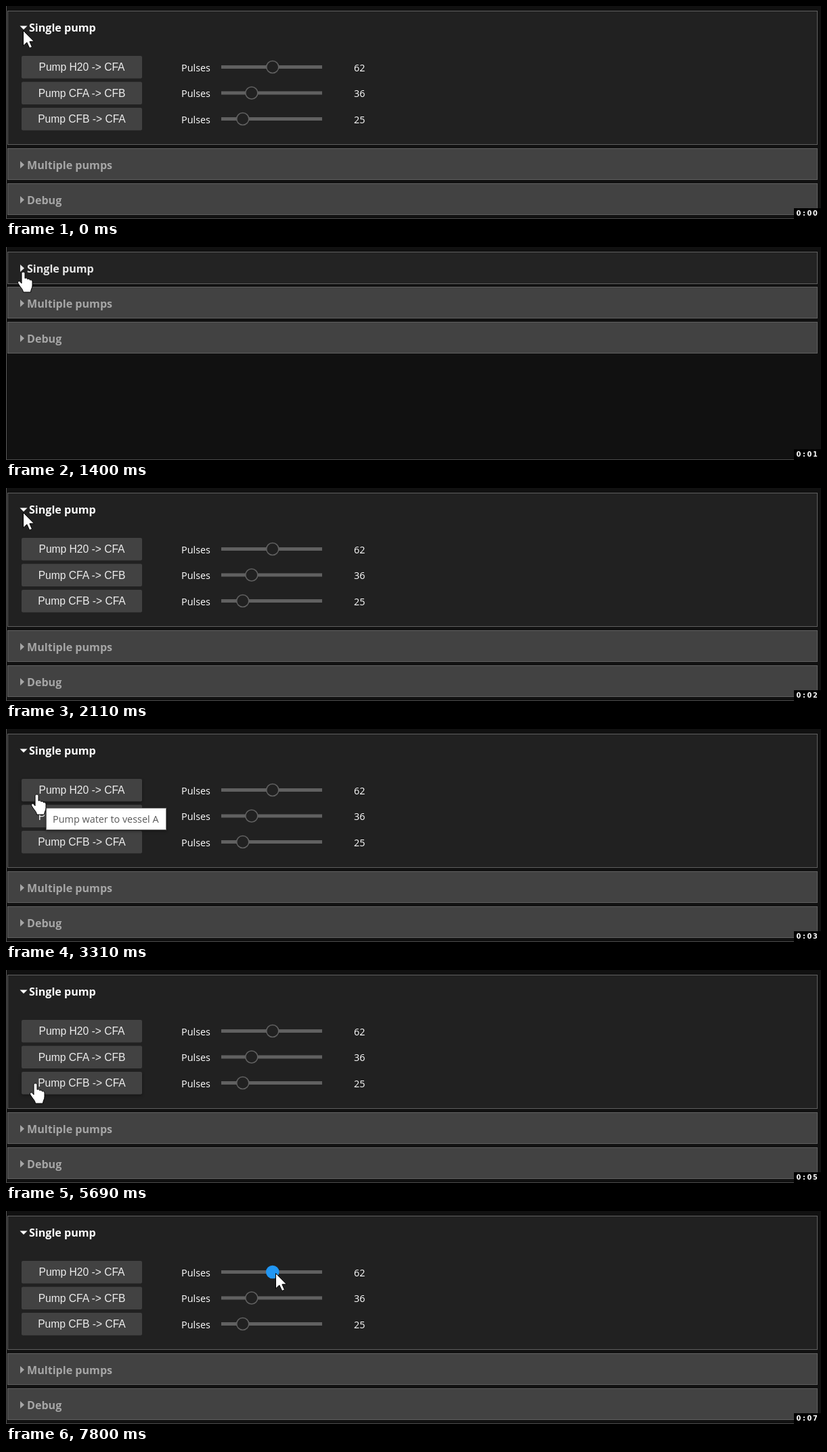
These frames come from a looping animation (1204x316 px, 8000 ms). An HTML page:

```html
<!DOCTYPE html>
<html lang="en">
<head>
<meta charset="utf-8">
<title>Pump panel</title>
<style>
  html, body { margin: 0; width: 100%; height: 100%; overflow: hidden; background: #111; }
  svg { display: block; width: 1204px; height: 316px; }
  text { white-space: pre; }
  .head { font: 700 16.1px "Open Sans", "Noto Sans", sans-serif; }
  .label { font: 14.4px "Open Sans", "Noto Sans", sans-serif; fill: #fff; }
  .button { font: 15.6px "Liberation Sans", Arial, sans-serif; fill: #eee; text-anchor: middle; }
  .tip { font: 14.4px "Open Sans", "Noto Sans", sans-serif; fill: #575757; }
  .clock { font: 700 9.8px "DejaVu Sans", sans-serif; fill: #fff; }
  .hover { filter: drop-shadow(0 2px 2px rgba(0, 0, 0, .35)); }
  .cursor { fill: #fff; stroke: #000; stroke-width: 1; stroke-linejoin: round; }
</style>
</head>
<body>
<svg id="stage" viewBox="0 0 1204 316"></svg>
<script>
const LOOP = 8000;
const stage = document.getElementById('stage');

const rows = [
  { text: 'Pump H20 -> CFA', value: 62, y: 90.5 },
  { text: 'Pump CFA -> CFB', value: 36, y: 129 },
  { text: 'Pump CFB -> CFA', value: 25, y: 167.5 },
];

const shapes = {
  arrow: 'M0 0V22.5L5.3 17.5L9.3 26L13 24.4L9.4 16.3H16Z',
  hand: 'M-2.5 2.5C-2.5-.8 2.5-.8 2.5 2.5V9.5C4-.0 4 8 6.3 10.5C7 9 9.6 9.5 10 12C11.5 11 13.5 12 13.5 14.5' +
        'V20C13.5 24 11 26 11 30H0C-.5 26-3 24-5 21L-7.6 17C-9 14-6 12.5-4 15L-2.5 17Z'
         .replace('', ''),
};
shapes.hand = 'M-2.5 2.5C-2.5-.8 2.5-.8 2.5 2.5V9.5C3.5 8.3 6 8.8 6.3 10.8C7.3 9.6 9.7 10 10 12.2' +
  'C11.3 11.2 13.5 12 13.5 14.5V20C13.5 24 11 26 11 30H0C-.5 26-3 24-5 21L-7.6 17C-9 14-6 12.5-4 15L-2.5 17Z';

// Pointer steps: start time, shape, tip x, tip y, hovered row
const pointerSteps = [
  [0, 'arrow', 25.5, 36.5, -1],
  [1400, 'hand', 25.5, 37, -1],
  [2110, 'arrow', 25.5, 36.5, -1],
  [2670, 'arrow', 33, 62, -1],
  [2790, 'hand', 42.5, 96, 0],
  [2930, 'hand', 45.5, 97, 0],
  [3990, 'hand', 42, 103, 0],
  [4090, 'hand', 39.5, 108.5, 0],
  [4240, 'hand', 38.5, 119, 1],
  [4370, 'hand', 39.5, 129.5, 1],
  [5390, 'hand', 45.5, 145, 1],
  [5540, 'hand', 42.5, 162.5, 2],
  [5690, 'hand', 43.5, 168, 2],
  [6880, 'hand', 169.5, 156.5, 2],
  [7020, 'arrow', 245, 140, -1],
  [7130, 'arrow', 335, 114, -1],
  [7250, 'arrow', 413, 90, -1],
  [7400, 'arrow', 408, 91, -1],
  [7530, 'arrow', 404.5, 92, -1],
  [7680, 'arrow', 401, 92.5, -1],
  [7800, 'arrow', 398.5, 92.5, -1],
];

const tips = [
  { from: 3310, to: 4240, x: 59, y: 117, w: 178, text: 'Pump water to vessel A' },
  { from: 4800, to: 5540, x: 53, y: 149, w: 217, text: 'Pump from vessel A to B now' },
  { from: 6090, to: 6880, x: 57, y: 188, w: 217, text: 'Pump from vessel B to A now' },
];

const clockTimes = [870, 1960, 2930, 3990, 5080, 6090, 7020];

const rect = (x, y, w, h, fill, more = '') =>
  `<rect x="${x}" y="${y}" width="${w}" height="${h}" fill="${fill}" ${more}/>`;
const text = (kind, x, y, string, more = '') =>
  `<text class="${kind}" x="${x}" y="${y}" ${more}>${string.replace('>', '&gt;')}</text>`;

function panel(y, height, title, fill, color, open) {
  const marker = open ? `M20.5 ${y + 22.5}h11l-5.5 5.5z` : `M21 ${y + 19}v11l6-5.5z`;
  return rect(2.5, y + .5, 1196, height - 1, fill, 'stroke="#606060"') +
    `<path d="${marker}" fill="${color}"/>` +
    text('head', open ? 34 : 31, y + 30.5, title, `fill="${color}"`);
}

function pumpRow({ text: title, value, y }, hovered, active) {
  return rect(23, y - 16.5, 178, 33.5, '#424242', `rx="2" ${hovered ? 'class="hover"' : ''}`) +
    text('button', 112, y + 5.5, title) +
    text('label', 259, y + 6, 'Pulses') +
    rect(318, y - 2.5, 149, 5, '#616161') +
    `<circle cx="${320 + 1.19 * value}" cy="${y}" r="9" stroke-width="1.5"
      fill="${active ? '#2196f3' : '#212121'}" stroke="${active ? '#2196f3' : '#616161'}"/>` +
    text('label', 514, y + 6, String(value));
}

function tooltip({ x, y, w, text: string }) {
  return rect(x + .5, y + .5, w - 1, 32, '#fff', 'stroke="#767676" class="hover"') +
    text('tip', x + 10, y + 22, string);
}

function scene(t) {
  const [, shape, x, y, hovered] = pointerSteps.findLast(step => step[0] <= t);
  const open = t < 1400 || t >= 2110;
  const shift = open ? 0 : -152;
  const seconds = clockTimes.filter(time => time <= t).length;

  return rect(0, 0, 1204, 316, '#111') +
    rect(0, 0, 1, 316, '#5a5a5a') + rect(0, 315, 1204, 1, '#4a4a4a') +
    panel(7, open ? 199 : 48, 'Single pump', open ? '#212121' : '#232323', open ? '#fff' : '#e6e6e6', open) +
    (open ? rows.map((row, i) => pumpRow(row, i === hovered, i === 0 && t >= 7530)).join('') : '') +
    panel(211 + shift, 47, 'Multiple pumps', '#424242', '#a6a6a6', false) +
    panel(263 + shift, 47, 'Debug', '#424242', '#a6a6a6', false) +
    tips.filter(tip => t >= tip.from && t < tip.to).map(tooltip).join('') +
    `<path class="cursor" d="${shapes[shape]}" transform="translate(${x} ${y})"/>` +
    rect(1164, 300, 40, 16, '#000') +
    text('clock', '1167.5 1177 1183.5 1192', 311, `0:0${seconds}`);
}

let shown = '';
function draw() {
  const next = scene(performance.now() % LOOP);
  if (next !== shown) stage.innerHTML = shown = next;
  requestAnimationFrame(draw);
}
draw();
</script>
</body>
</html>
```
